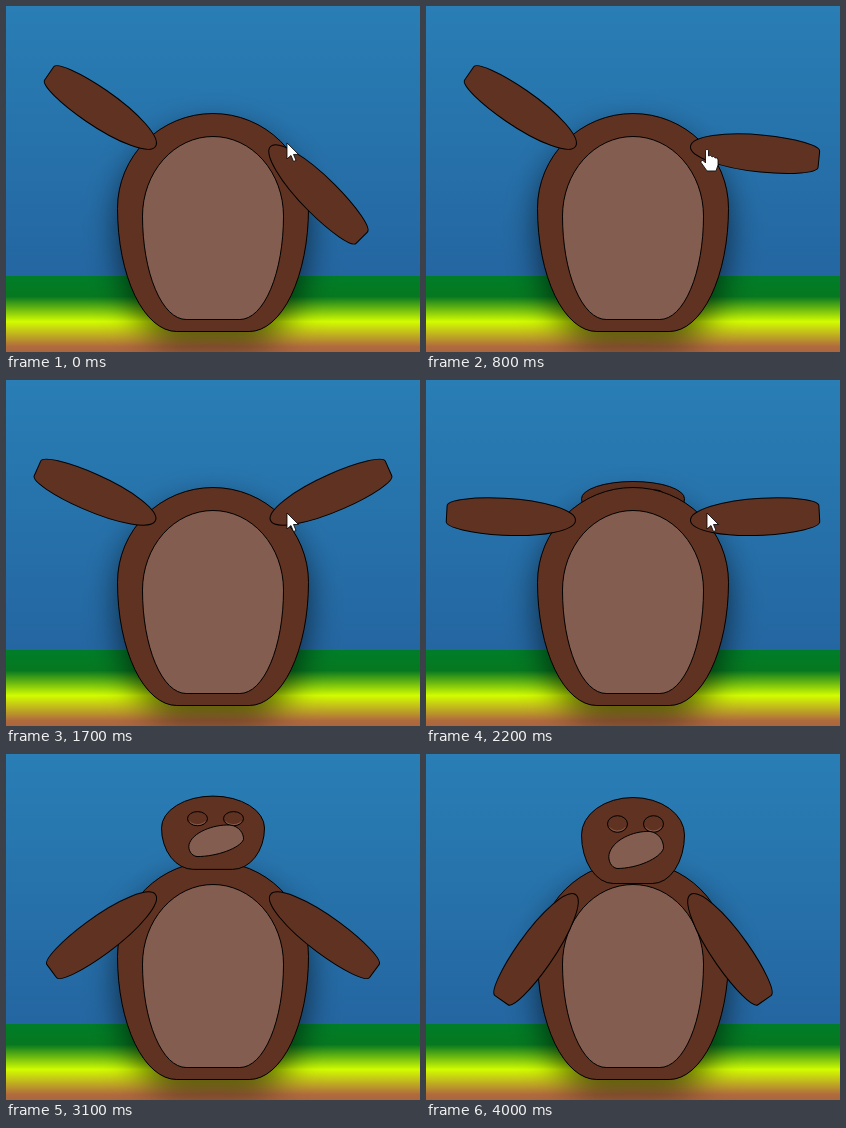
Write an HTML page with a canvas that moves like this. It is 414x346 px and loops after 4100 ms.

```html
<!DOCTYPE html>
<html>
<head>
<meta charset="utf-8">
<style>
  html, body { margin: 0; width: 100%; height: 100%; overflow: hidden; }
  canvas { display: block; }
</style>
</head>
<body>
<canvas id="stage" width="414" height="346"></canvas>
<script>
const ctx = document.getElementById('stage').getContext('2d');
const LOOP = 4100, BROWN = '#603221', PALE = '#835d4f';
const RAISED = -34.5, LOWERED = 55;

const mix = (a, b, u) => a + (b - a) * u;
const span = (t, from, to) => Math.min(1, Math.max(0, (t - from) / (to - from)));
const soften = u => mix(u, u * u * (3 - 2 * u), .2);

// The right arm waves upwards first, then both arms sink together.
const sinking = t => mix(RAISED, LOWERED, soften(span(t, 1400, 3600)));
const waving = t => mix(45, RAISED, span(t, 0, 1350) ** 1.35);

// The head peeks out, shoots up from behind the body and settles in front of it.
function headTop(t) {
  if (t < 2200) return mix(128, 101.5, span(t, 1900, 2200));
  if (t < 2600) return mix(101.5, 97.5, span(t, 2200, 2600));
  if (t < 3260) return mix(97.5, 24.5, span(t, 2600, 3260));
  return mix(24.5, 43.5, span(t, 3260, 3700));
}
const headScale = t => mix(.46, 1, span(t, 2600, 3290));

function gradient(y0, y1, stops) {
  const g = ctx.createLinearGradient(0, y0, 0, y1);
  stops.forEach(([at, color]) => g.addColorStop(at, color));
  return g;
}
const sky = gradient(0, 270, [[0, '#297eb5'], [1, '#2466a1']]);
const ground = gradient(270, 346, [[0, '#007d29'], [.27, '#067820'], [.6, '#d2fc00'],
  [.93, '#b06a3e'], [1, '#aa663f']]);

function paint(fill) {
  ctx.fillStyle = fill;
  ctx.fill();
  ctx.strokeStyle = '#000';
  ctx.lineWidth = 1;
  ctx.stroke();
}

function egg(x, y, w, h) {
  const top = { x: w / 2, y: h * .435 }, bottom = { x: w * .31, y: h * .565 };
  ctx.beginPath();
  ctx.roundRect(x, y, w, h, [top, top, bottom, bottom]);
}

function drawBody() {
  egg(111.5, 107.5, 191, 218);
  ctx.save();
  ctx.shadowColor = 'rgba(0,0,0,.6)';
  ctx.shadowBlur = 32;
  ctx.shadowOffsetY = 14;
  ctx.fillStyle = BROWN;
  ctx.fill();
  ctx.restore();
  paint(BROWN);
  egg(136.5, 130.5, 141, 183);
  paint(PALE);
}

function drawArm(side, angle) {
  const rear = { x: 72, y: 18.5 }, tip = { x: 57, y: 10.5 };
  ctx.save();
  ctx.translate(207 + side * 57.5, 140.5);
  ctx.scale(side, 1);
  ctx.rotate(angle * Math.PI / 180);
  ctx.beginPath();
  ctx.roundRect(0, -18.5, 129, 37, [rear, tip, tip, rear]);
  paint(BROWN);
  ctx.restore();
}

function drawHead(top, s) {
  egg(155.5, top, 103, 86 * s);
  paint(BROWN);
  for (const x of [191.5, 227.5]) {
    const y = top + 26.5 * s;
    ctx.beginPath();
    ctx.ellipse(x, y, 10, 8.3 * s, 0, 0, 7);
    paint(BROWN);
    ctx.beginPath();
    ctx.ellipse(x, y, 8.8, 7 * s, 0, .5, 2.64);
    ctx.strokeStyle = PALE;
    ctx.stroke();
  }
  ctx.save();
  ctx.translate(207, top);
  ctx.scale(1, s);
  ctx.beginPath();
  ctx.moveTo(-24, 57);
  ctx.bezierCurveTo(-21, 43, 0, 33, 17, 34);
  ctx.bezierCurveTo(26, 35, 31, 44, 30.5, 51);
  ctx.bezierCurveTo(27, 61, 4, 71, -16, 71);
  ctx.bezierCurveTo(-22, 70, -25, 63, -24, 57);
  ctx.restore();
  paint(PALE);
}

const arrow = new Path2D('M0 0V16L4 12.5L6.5 18.5L9 17.5L6.5 11.5H11.5Z');
const hand = new Path2D('M-1.5 1.5Q0 -1 1.5 1.5V7Q4 5.5 5 8Q7 6.5 8 9Q11 8 11 11V16L9 22H0L-6 13.5Q-6 10.5 -3.5 12L-1.5 14Z');

function drawPointer(t) {
  if (t >= 2400) return;
  const shape = t >= 200 && t < 1500 ? hand : arrow;
  ctx.save();
  ctx.translate(281, 133 + 10 * Math.sin(Math.PI * span(t, -250, 1700)));
  ctx.fillStyle = '#fff';
  ctx.strokeStyle = '#000';
  ctx.lineWidth = .8;
  ctx.fill(shape);
  ctx.stroke(shape);
  ctx.restore();
}

function draw(now) {
  const t = now % LOOP;
  const head = () => drawHead(headTop(t), headScale(t));
  const headInFront = t >= 3050;
  ctx.fillStyle = sky;
  ctx.fillRect(0, 0, 414, 270);
  ctx.fillStyle = ground;
  ctx.fillRect(0, 270, 414, 76);
  if (t > 1900 && !headInFront) head();
  drawBody();
  drawArm(-1, sinking(t));
  drawArm(1, t < 1400 ? waving(t) : sinking(t));
  if (headInFront) head();
  drawPointer(t);
  requestAnimationFrame(draw);
}
requestAnimationFrame(draw);
</script>
</body>
</html>
```
